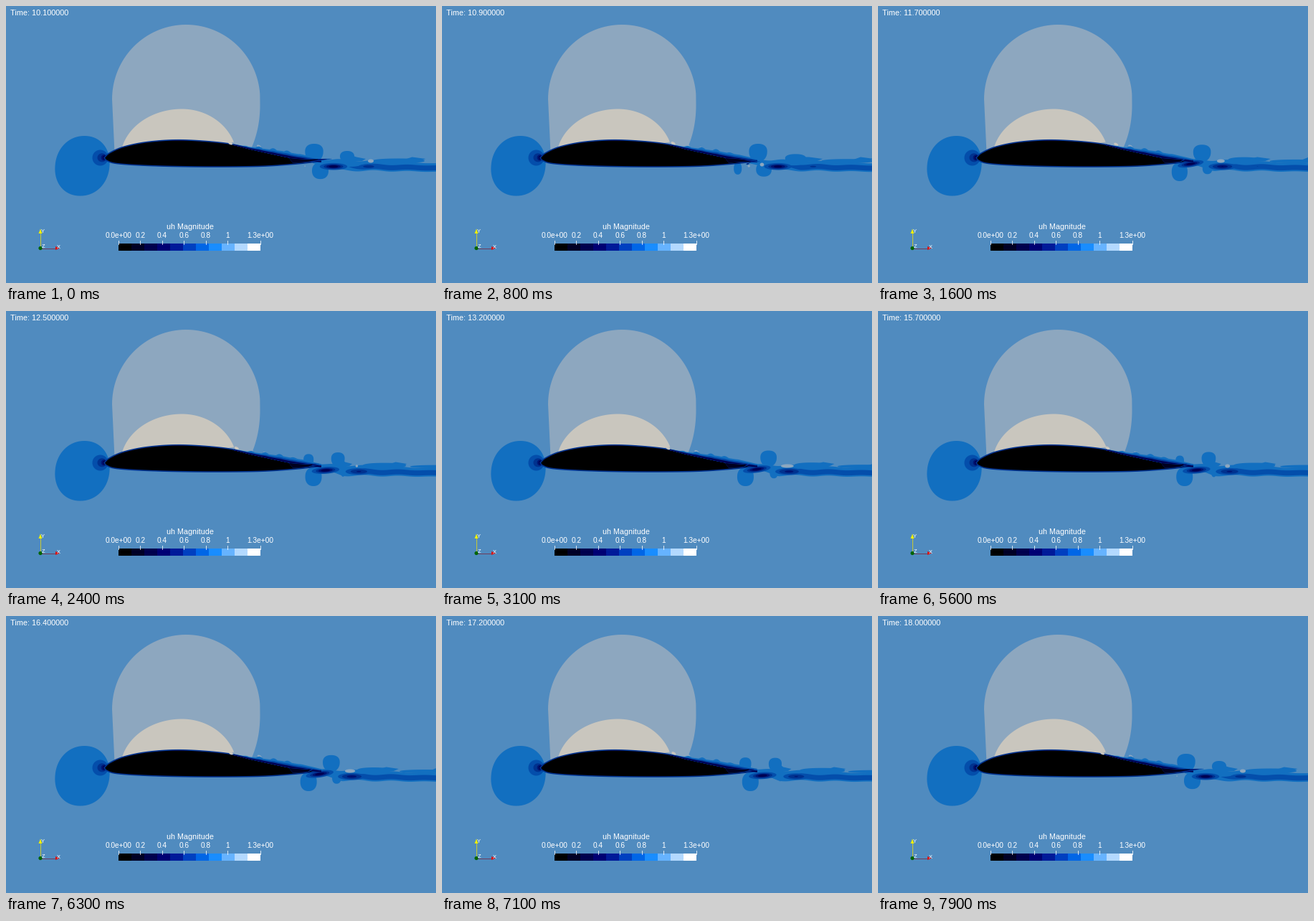
A matplotlib script for the animation above (8 s loop, 600 by 386 pixels).

```python
import numpy as np
import matplotlib.pyplot as plt
from matplotlib.animation import FuncAnimation
from matplotlib.patches import Circle, Polygon, Rectangle

W, H, DPI = 600, 386, 100
FRAMES, CYCLES = 80, 32 / 79          # vortex shedding cycles per frame
PX = 72 / DPI
TAU = 2 * np.pi

BACK, GREY, BEIGE = "#508bbf", "#8da7bf", "#c9c6be"
MID, BLUE, DEEP, NAVY, INK = "#126fc0", "#044eab", "#00328f", "#001473", "#000050"

fig = plt.figure(figsize=(W / DPI, H / DPI), dpi=DPI, facecolor=BACK)
ax = fig.add_axes([0, 0, 1, 1])
ax.set(xlim=(0, W), ylim=(H, 0))
ax.axis("off")


def ramp(v, a, b):
    return np.clip((v - a) / (b - a), 0, 1)


def smooth(pts, n=10):
    """Catmull-Rom curve through an open list of points."""
    p = np.array(pts, float)
    p = np.vstack([2 * p[0] - p[1], p, 2 * p[-1] - p[-2]])
    a, b, c, d = (p[i:len(p) - 3 + i, None] for i in range(4))
    t = np.linspace(0, 1, n, endpoint=False)[None, :, None]
    q = b + t * (c - a) / 2 + t**2 * (a - 2.5 * b + 2 * c - d / 2) \
        + t**3 * (1.5 * (b - c) + (d - a) / 2)
    return np.vstack([q.reshape(-1, 2), p[-2]])


def oval(cx, cy, rx, ry, tilt=0, power=1.0, neck=0, skew=0):
    a = np.linspace(0, TAU, 73)
    c, s = np.cos(a), np.sin(a)
    x = rx * np.sign(c) * abs(c)**power * (1 - neck * (s + 1) / 2)
    y = ry * np.sign(s) * abs(s)**power
    return np.column_stack([cx + x + skew * y, cy + y + tilt * x])


def arc(cx, cy, left, right, ry, start, stop):
    """Upper arc, clockwise in degrees from the left, with two side radii."""
    a = np.radians(np.linspace(start, stop, 70))
    c = -np.cos(a)
    return np.column_stack([cx + np.where(c < 0, left, right) * c,
                            cy - ry * np.sin(a)])


def band(x, top, bottom):
    return np.vstack([np.column_stack([x, top]),
                      np.column_stack([x, bottom])[::-1]])


def shape(pts, color, z, **kw):
    return ax.add_patch(Polygon(pts, closed=True, fc=color, zorder=z, **{"lw": 0, **kw}))


def empty(color, z):
    return shape(np.zeros((3, 2)), color, z)


def text(x, y, s, px, **kw):
    return ax.text(x, y, s, fontsize=px * PX, family="Liberation Sans",
                   color="white", va="baseline", zorder=20, **kw)


# Vortices as functions of their age in shedding cycles
def upper_blob(age):
    x = 430 + (46 if age > 0 else 28) * age + 26 * max(age - 1, 0)
    r = 14 * ramp(age, -.5, -.1) - 4 * ramp(age, .45, .75) + 26 * ramp(age, 1.1, 1.9)
    top = (212 - 20 * ramp(age, -.5, -.15) + 5.5 * ramp(age, .4, .75)
           + 13.5 * ramp(age, .75, 1.5) + 3 * max(age - 1.5, 0))
    return x, r, top, 217 + 2 * ramp(age, 1, 1.5)


def lower_blob(age):
    x = 438.5 + 34 * age + 10 * max(age, 0)
    r = 11.5 * (ramp(age, -1, -.5) - ramp(age, .2, .9))
    return x, r, 221 + 23 * ramp(age, -1, -.6) - 15 * ramp(age, -.2, .85)


def core(age):
    x = 457 + (49 if age > 0 else 40) * age
    grow, settle = ramp(age, -.8, -.5), ramp(age, -.5, -.1)
    return (x, 220 + 3.7 * settle, 16 * grow, 4 * grow, -.15 * (1 - settle),
            1 - .55 * max(age, 0))


# Steady flow around the wing
grey, beige = empty(GREY, 1), empty(BEIGE, 2)
shape(oval(106.5, 222.8, 38, 41.8, power=.95, skew=-.07), MID, 3)
for spot, color in (((131.5, 211.5, 11, 11), BLUE), ((134, 211.3, 6.5, 6), DEEP),
                    ((136.5, 211.3, 3.8, 4), NAVY), ((137.5, 211.3, 2.5, 2.8), INK)):
    shape(oval(*spot), color, 3)

TOP = smooth([(137, 211.5), (145, 204.5), (165, 196), (200, 189.2), (247, 186.8),
              (307, 191.3), (345, 199.8), (400, 211.5), (438, 216.5)])
LOW = smooth([(438, 216.5), (400, 220.5), (350, 223.5), (270, 224), (200, 222.5),
              (155, 219.6), (141, 215.5), (137, 211.5)])
shape(np.vstack([TOP, LOW]), "black", 9, ec=DEEP, lw=1.6 * PX)

KS = (-1, 0, 1, 2)
uppers, tails, lowers = ([empty(MID, 4) for _ in KS] for _ in range(3))
wake, wake_in = empty(MID, 4), empty(BLUE, 6)
RINGS = ((BLUE, 1.2, 0), (DEEP, .85, .15), (NAVY, .62, .5), (INK, .4, .7))
cores = [[empty(c, 7 + i * .1) for _ in KS] for i, (c, _, _) in enumerate(RINGS)]
LAYERS = ((MID, 1), (BLUE, .66), (DEEP, .42), (INK, .25))
layers = [empty(c, 10 + i * .1) for i, (c, _) in enumerate(LAYERS)]
streaks = [empty(c, 11 + i * .1) for i, c in enumerate((BLUE, NAVY, "#000020"))]
flecks = [empty(GREY if i else BEIGE, 9.5) for i in range(3)]
# Pale pockets: phase of largest size, then x, y, half width there
POCKETS = ((.15, 424, 223, 3), (.23, 446, 221, 3), (.56, 482, 216, 9), (1, 509, 216, 4))
pockets = [empty(GREY, 5) for _ in POCKETS]

# Legend
STOPS = (0, 1 / 3, 2 / 3, 1)
for i in range(11):
    rgb = [np.interp(i / 10, STOPS, c)
           for c in ((0, 0, 0, 1), (0, 0, .502, 1), (0, .502, 1, 1))]
    ax.add_patch(Rectangle((157 + 18 * i, 331), 18, 10, fc=rgb, lw=0, zorder=15,
                           antialiased=False))
labels = ["0.0e+00", "0.2", "0.4", "0.6", "0.8", "1", "1.3e+00"]
for i, s in enumerate(labels):
    x = 355 if i == 6 else 157 + 30.4 * i
    ax.plot([x, x], [327, 332], color="white", lw=.8 * PX, zorder=16)
    text(x, 322.7, s, 10.1, ha="center")
text(256.5, 310.7, "uh Magnitude", 10.8, ha="center")
clock = text(6, 13.3, "", 10.9)

# Orientation axes
ax.plot([48, 48], [335, 316], color="#c8c832", lw=PX, zorder=15)
ax.plot([50, 69], [337.5, 337.5], color="#6e3c5a", lw=PX, zorder=15)
shape([(45.5, 317), (48, 310.5), (50.5, 317)], "#f0f000", 16)
shape([(69, 335), (75, 337.5), (69, 340)], "#d81010", 16)
ax.add_patch(Circle((48, 337.5), 2.6, fc="#006400", lw=0, zorder=16))
for x, y, s in ((51.5, 316.5, "Y"), (52.5, 337, "Z"), (73.5, 337.5, "X")):
    text(x, y, s, 7.5, ha="center")

XS = np.linspace(318, 440, 123)
SURFACE = np.interp(XS, TOP[:, 0], TOP[:, 1])
THICK = .5 + 6 * ramp(XS, 320, 385) - 3 * ramp(XS, 415, 440)
RIPPLE = 2.3 * ramp(XS, 330, 347) * (1 - ramp(XS, 390, 415))
XW = np.linspace(428, 604, 120)
WAVE = 1.4 * ramp(XW, 430, 460) * (1 - .8 * ramp(XW, 460, 600))
INNER = XW > 478


def draw_flow(phi):
    sway = np.sin(2 * TAU * phi)
    t = np.linspace(0, 1, 20)[:, None]
    side = ((1 - t)**2 * [354.5, 138] + 2 * t * (1 - t) * [354.5, 172]
            + t**2 * [341.5 + 1.5 * sway, 200])
    grey.set_xy(np.vstack([[(151.5, 204)], arc(251.3, 130, 103.3, 103.3, 104, 0, 176),
                           side, [(250, 210)]]))
    beige.set_xy(np.vstack([arc(245.5, 213.5, 86, 77 + sway, 70, 8, 160), [(250, 200)]]))


def draw_vortices(phi):
    for j, k in enumerate(KS):
        age = phi + k
        x, r, top, low = upper_blob(age)
        uppers[j].set_xy(oval(x, (top + low) / 2, r, (low - top) / 2,
                              power=.88, neck=.2 if age < 1 else 0))
        reach = 2.6 * r * ramp(age, .5, .8) * (1 - .6 * ramp(age, 1.3, 1.6))
        tails[j].set_xy([(x, top + 4), (x + reach * .5, 210.5), (x + reach, 213),
                         (x + reach * .8, 216), (x, 218)])
        x, r, low = lower_blob(age)
        lowers[j].set_xy(oval(x, (low + 218) / 2, r, (low - 218) / 2, power=.88))
        x, y, rx, ry, tilt, power = core(age)
        for ring, (_, size, floor) in zip(cores, RINGS):
            f = size * ramp(power, floor, floor + (1 - floor) * .625)
            ring[j].set_xy(oval(x, y, rx * f, ry * f, tilt))


def draw_wake(phi):
    wave = WAVE * np.sin(TAU * ((XW - 430) / 48 - phi))
    wake.set_xy(band(XW, 213.3 + 6 * ramp(XW, 428, 604) + wave,
                     219 + 10 * ramp(XW, 428, 470) + 2 * ramp(XW, 470, 604) + wave))
    x, w = XW[INNER], wave[INNER]
    half = 3.5 * ramp(x, 478, 500)
    mid = 224 + 1.7 * ramp(x, 500, 604) + w
    wake_in.set_xy(band(x, mid - half, mid + half))
    for p, (peak, x, y, r) in zip(pockets, POCKETS):
        d = (phi - peak + .5) % 1 - .5
        size = r * max(0, 1 - abs(d) / .2)
        p.set_xy(oval(x + 46 * d, y, size, min(size, 2.5)))


def draw_layer(phi):
    bumps = RIPPLE * np.maximum(0, np.sin(TAU * ((XS - 348) / 20 - 2 * phi)))
    for p, (_, share) in zip(layers, LAYERS):
        rise = THICK * share + bumps * (1 if share == 1 else share * .3)
        p.set_xy(band(XS, SURFACE - rise, SURFACE + 1))
    for j, p in enumerate(flecks):
        x = 313 + 20 * j + 20 * (2 * phi % 1)
        y = np.interp(x, XS, SURFACE) - 2 - 4 * ramp(x, 313, 355)
        p.set_xy(oval(x, y, 3, 2 * (1 - ramp(x, 355, 366)), .35))
    tip = 428 + 27 * max(ramp(phi, .58, 1), 1 - ramp(phi, .1, .45))
    y = 213 + 4 * max(0, np.sin(TAU * phi))
    for p, f in zip(streaks, (1, .8, .45)):
        p.set_xy(smooth([(395, 212), (418, 214.4 - f), (420 + (tip - 420) * f, y + 1 - f),
                         (420, 216.5 + f), (400, 218.5)]))


def draw(i):
    phi = i * CYCLES % 1
    clock.set_text(f"Time: {10.1 + i / 10:.6f}")
    for part in (draw_flow, draw_vortices, draw_wake, draw_layer):
        part(phi)
    return []


anim = FuncAnimation(fig, draw, frames=FRAMES, interval=100, repeat=True,
                     init_func=lambda: draw(0), blit=False)
plt.show()
```
